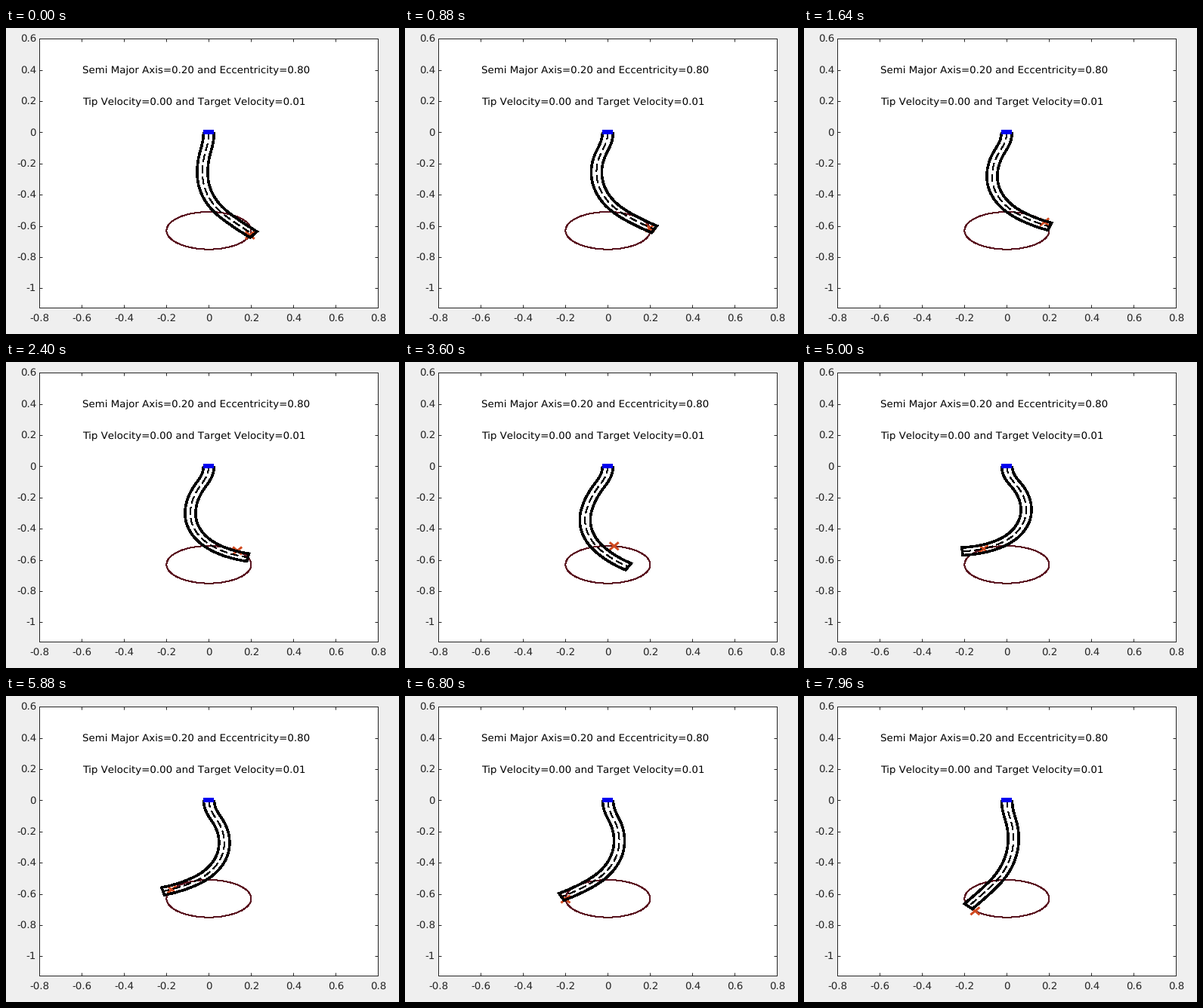
Animation of 520 by 406 pixels, one loop 8000 ms. Source, as a matplotlib script:

```python
import numpy as np
import matplotlib.pyplot as plt
from matplotlib.animation import FuncAnimation
from matplotlib.patches import Ellipse, Rectangle

W, H, DPI = 520, 406, 64
FRAMES, STEP = 200, 40
PT = 72 / DPI                      # points per pixel
X0, Y0, SX, SY = 268.4, 138.4, 280, 207
LEFT, TOP, RIGHT, BOTTOM = 44.4, 14.4, 492.4, 371.4
LENGTH, HALF = 0.745, 0.025        # arm length and half width, data units
AXIS, ECC, DEPTH = 0.2, 0.8, -0.63
DARK = "#262626"

# Direction of the arm (radians from straight down) at four joints, by time
JOINTS = [0, 0.11, 0.3, 0.57, LENGTH]
BENDS = {
    0.00: (-0.24, 0.07, 0.79, 0.88),
    0.88: (-0.42, 0.10, 0.90, 1.06),
    2.40: (-0.56, -0.07, 0.96, 1.40),
    3.60: (-0.56, -0.22, 0.71, 1.06),
    5.00: (0.64, 0.00, -1.10, -1.52),
    6.80: (0.42, -0.09, -0.90, -1.10),
    7.96: (0.26, -0.10, -0.66, -0.73),
}

plt.rcParams.update({"text.hinting": "no_hinting", "text.kerning_factor": 6,
                     "font.family": "DejaVu Sans", "font.size": 13.33 * PT,
                     "lines.solid_capstyle": "butt"})


def px(x, y):
    return X0 + SX * x, Y0 - SY * y


def target_at(t):
    """Point on the ellipse, speeding up slightly as it goes round."""
    a = np.radians(-14 + 24 * t + 0.7 * t * t)
    return px(AXIS * np.cos(a), DEPTH + AXIS * np.sqrt(1 - ECC**2) * np.sin(a))


def arm_at(t, n=60):
    """Centre line and closed-end outline of the arm in pixels."""
    joints = [np.interp(t, list(BENDS), col) for col in zip(*BENDS.values())]
    ds = LENGTH / n
    s = (np.arange(n) + 0.5) * ds
    spread = np.linspace(-0.035, 0.035, 9)[:, None]
    bend = np.interp(s + spread, JOINTS, [0, *joints]).mean(axis=0)
    x = np.r_[0, np.cumsum(np.sin(bend)) * ds]
    y = np.r_[0, -np.cumsum(np.cos(bend)) * ds]
    node = np.r_[0, (bend[1:] + bend[:-1]) / 2, bend[-1]]
    nx, ny = HALF * np.cos(node), HALF * np.sin(node)
    edge_x = np.r_[x - nx, (x + nx)[::-1]]
    edge_y = np.r_[y - ny, (y + ny)[::-1]]
    return px(x, y), px(edge_x, edge_y)


fig = plt.figure(figsize=(W / DPI, H / DPI), dpi=DPI, facecolor="#efefef")
ax = fig.add_axes([0, 0, 1, 1])
ax.set_xlim(0, W)
ax.set_ylim(H, 0)
ax.axis("off")


def line(xs, ys, color, width, **kw):
    return ax.plot(xs, ys, color=color, lw=width * PT, **kw)[0]


def label(x, y, text, color=DARK, ha="left"):
    ax.text(x, y, text, color=color, ha=ha, va="baseline")


ax.add_patch(Rectangle((LEFT, TOP), RIGHT - LEFT, BOTTOM - TOP,
                       fc="white", ec=DARK, lw=PT, zorder=0))
for v in np.arange(-4, 5) / 5:
    x = px(v, 0)[0]
    line([x, x], [BOTTOM, BOTTOM - 4], DARK, 1)
    line([x, x], [TOP, TOP + 4], DARK, 1)
    label(x, 389, f"{v:g}", ha="center")
for v in np.arange(-5, 4) / 5:
    y = px(0, v)[1]
    line([LEFT, LEFT + 4], [y, y], DARK, 1)
    line([RIGHT, RIGHT - 4], [y, y], DARK, 1)
    label(40, y + 4, f"{v:g}", ha="right")

label(101, 60, f"Semi Major Axis={AXIS:.2f} and Eccentricity={ECC:.2f}", "black")
label(101, 102, "Tip Velocity=0.00 and Target Velocity=0.01", "black")

ax.add_patch(Ellipse(px(0, DEPTH), 2 * AXIS * SX, 2 * AXIS * np.sqrt(1 - ECC**2) * SY,
                     fc="none", ec="#5a1420", lw=PT, antialiased=False, zorder=3))
cross = [line([], [], "#d04a20", 3, zorder=4) for _ in range(2)]
outline = line([], [], "black", 2.5, zorder=5, solid_joinstyle="miter", antialiased=False)
middle = line([], [], "black", 1.2, zorder=5, dashes=(8, 5), dash_capstyle="butt",
              antialiased=False)
ax.add_patch(Rectangle((261, 135), 14, 6, fc="#0000f0", ec="none", zorder=6))


def update(i):
    t = i * STEP / 1000
    x, y = target_at(t)
    for part, side in zip(cross, (1, -1)):
        part.set_data([x - 6, x + 6], [y - 5 * side, y + 5 * side])
    centre, edge = arm_at(t)
    middle.set_data(*centre)
    outline.set_data(*edge)
    return [*cross, outline, middle]


anim = FuncAnimation(fig, update, frames=FRAMES, interval=STEP,
                     repeat=True, cache_frame_data=False)
plt.show()
```
